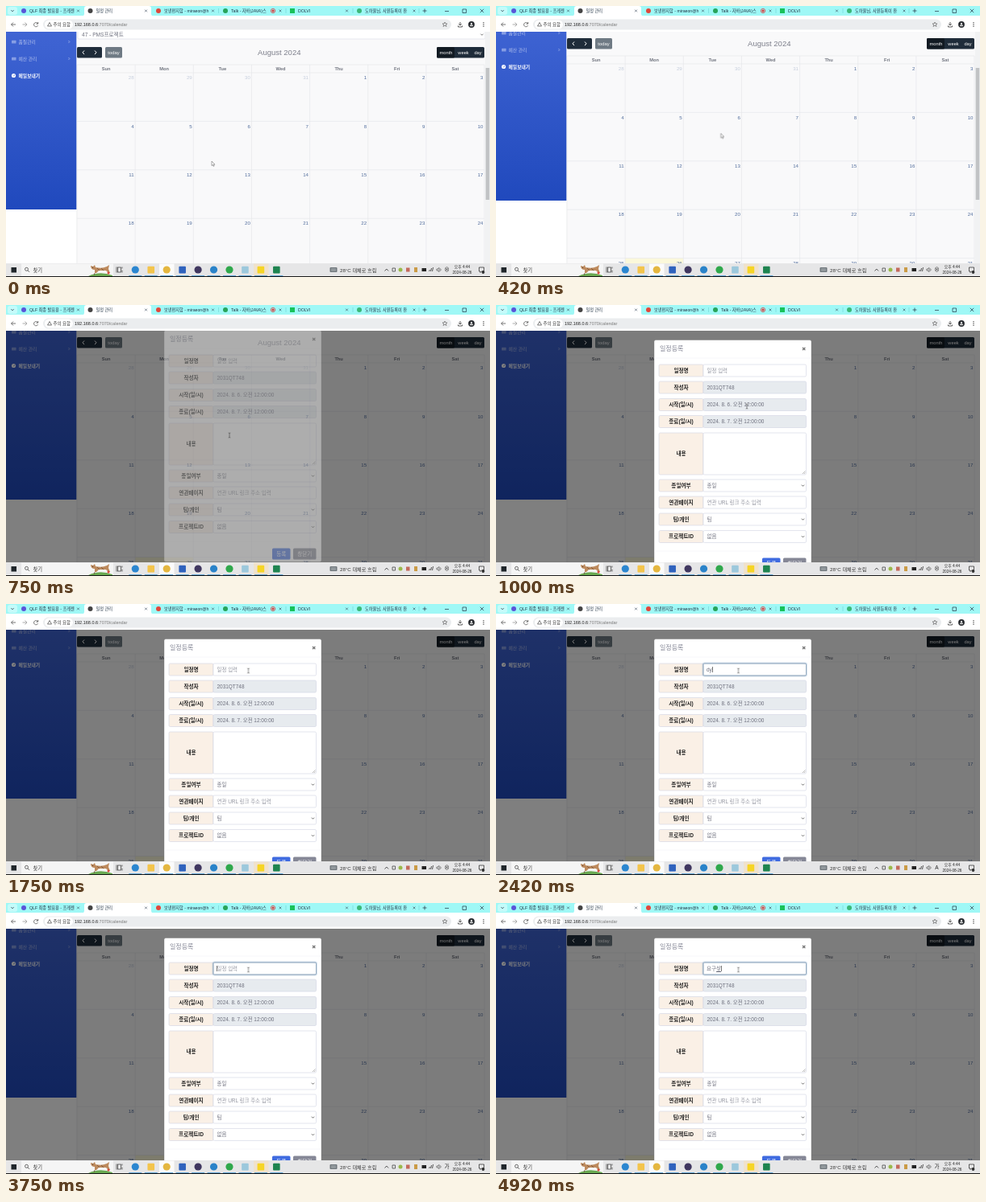
An HTML page that plays this animation: 600x337 px, repeating every 5 s.

```html
<!DOCTYPE html>
<html lang="ko">
<head>
<meta charset="utf-8">
<title>일정 관리</title>
<style>
html, body { margin: 0; width: 100%; height: 100%; overflow: hidden; background: #fff; }
svg { display: block; width: 100%; height: 100%; }
svg, .html { font-family: "Liberation Sans", "Noto Sans CJK KR", "Noto Sans CJK", sans-serif; }
.html { color: #6e707e; font-size: 6.5px; line-height: 12px; white-space: nowrap; }

.scroll, .thumb, .pick, .dim, .modal, .arrow, .beam, .focus, .hint,
.typed, .typed::before, .typed::after, .ime::before { animation: 5s infinite step-end; }
.scroll { animation-name: scroll; animation-timing-function: ease-out; }
.thumb { animation-name: thumb; }
.pick { animation-name: pick; }
.dim { animation-name: dim; }
.modal { animation-name: modal; }
.arrow { animation-name: arrow-move, arrow-show; animation-timing-function: ease-in-out, step-end; }
.beam { animation-name: beam-move, beam-show; animation-timing-function: ease-in-out, step-end; }
.focus { animation-name: focus; }
.hint { animation-name: hint; }
.typed { border-right: .6px solid #777; animation-name: focus; }
.typed::before { content: ""; animation-name: committed; }
.typed::after { content: ""; text-decoration: underline; text-decoration-thickness: .6px; animation-name: composing; }
.ime { color: #222; text-align: center; }
.ime::before { content: "⊗"; animation-name: ime; }

@keyframes scroll { 0%, 1.6% { transform: none } 5%, 100% { transform: translateY(-11px) } }
@keyframes thumb { 0% { opacity: 1 } 10.8%, 100% { opacity: 0 } }
@keyframes pick { 0% { opacity: 0 } 10% { opacity: 1 } 15%, 100% { opacity: 0 } }
@keyframes dim { 0% { opacity: 0 } 11.6% { opacity: .11 } 13.4%, 100% { opacity: .5 } }
@keyframes modal {
  0% { opacity: 0; transform: translateY(-50px) }
  15% { opacity: .38; transform: translateY(-12px) }
  16.6% { opacity: .95; transform: translateY(-3px) }
  18.4%, 100% { opacity: 1; transform: none }
}
@keyframes arrow-move { 0%, 1.6% { transform: translate(255px, 193px) } 9%, 100% { transform: translate(279px, 158px) } }
@keyframes arrow-show { 0% { opacity: 1 } 15%, 100% { opacity: 0 } }
@keyframes beam-move {
  0%, 15.5% { transform: translate(277px, 162px) }
  19.5%, 22% { transform: translate(311px, 126px) }
  31%, 100% { transform: translate(300.5px, 83px) }
}
@keyframes beam-show { 0% { opacity: 0 } 15%, 100% { opacity: 1 } }
@keyframes focus { 0% { opacity: 0 } 36%, 100% { opacity: 1 } }
@keyframes hint { 0% { opacity: 1 } 46.6% { opacity: 0 } 68.4% { opacity: 1 } 83.4%, 100% { opacity: 0 } }
@keyframes committed {
  0% { content: "" } 46.6% { content: "d" } 48.4% { content: "dy" } 51.6% { content: "dyr" }
  55% { content: "dyrn" } 61.6% { content: "dyr" } 63.4% { content: "dy" } 65% { content: "d" }
  68.4% { content: "" } 90% { content: "요" } 95%, 100% { content: "요구" }
}
@keyframes composing {
  0% { content: "" } 83.4% { content: "ㅇ" } 85% { content: "요" } 88.4% { content: "욕" }
  90% { content: "구" } 93.4% { content: "굿" } 95% { content: "사" } 98.4%, 100% { content: "샇" }
}
@keyframes ime { 0% { content: "⊗" } 36% { content: "A" } 71.6%, 100% { content: "가" } }
</style>
</head>
<body>
<svg id="stage" viewBox="0 0 600 337" preserveAspectRatio="none"></svg>
<script>
const rect = (x, y, w, h, fill, extra = '') =>
  `<rect x="${x}" y="${y}" width="${w}" height="${h}" fill="${fill}" ${extra}/>`;
const dot = (x, y, r, fill, extra = '') => `<circle cx="${x}" cy="${y}" r="${r}" fill="${fill}" ${extra}/>`;
const line = (d, color = '#444', width = .8) =>
  `<path d="${d}" fill="none" stroke="${color}" stroke-width="${width}"/>`;
// y is the vertical middle of the text
const text = (x, y, str, size, fill, extra = '') =>
  `<text x="${x}" y="${y + size * .36}" font-size="${size}" fill="${fill}" ${extra}>${str}</text>`;
const cross = (x, y, r, color, width) =>
  line(`M${x - r} ${y - r}l${2 * r} ${2 * r}m0 ${-2 * r}l${-2 * r} ${2 * r}`, color, width);
const chevron = (x, y, color, width = .8) => line(`M${x - 1.6} ${y - .8}l1.6 1.6l1.6-1.6`, color, width);
const middle = 'text-anchor="middle"', end = 'text-anchor="end"', bold = 'font-weight="700"';

function sidebar() {
  const item = (y, label, opacity, weight) => `<g opacity="${opacity}">
    ${weight ? dot(9.5, y, 2.6, '#fff') + line(`M9.5 ${y + .8}l1.2-1.8`, '#3558c4') : rect(7, y - 1.8, 5.5, 3.8, '#b9c7f2', 'rx=".6"')}
    ${text(15.5, y, label, 5.8, '#fff', weight)}
    ${weight ? '' : line(`M77.4 ${y - 1.5}l1.5 1.5l-1.5 1.5`, '#fff', .7)}</g>`;
  return rect(0, 0, 87.3, 253, 'url(#blue)') +
    item(44.5, '품질관리', .6, '') + item(65.5, '예산 관리', .6, '') + item(86.5, '메일보내기', 1, bold);
}

function calendar() {
  const colX = c => 88 + 72.15 * c, rowY = r => 83 + 60.4 * r;
  const days = ['Sun', 'Mon', 'Tue', 'Wed', 'Thu', 'Fri', 'Sat'];
  const grid = '#e2e5e8', button = '#1f2c3a';
  let out = rect(87.3, 20, 513, 340, '#f9f9fa') +
    rect(89, 28, 505, 13, '#fff', 'stroke="#d8dae4" stroke-width=".6" rx="1.5"') +
    text(94, 35.5, '47 - PMS프로젝트', 6.6, '#6e707e') + chevron(590, 35.5, '#555') +
    rect(88, 51, 31, 13.5, button, 'rx="1.5"') +
    line('M97 55.5l-2 2.3l2 2.3M110 55.5l2 2.3l-2 2.3', '#fff', 1) +
    rect(123, 51, 21, 13.5, '#6f7a84', 'rx="1.5"') + text(133.5, 57.6, 'today', 5.9, '#fff', middle) +
    text(338.8, 58, 'August 2024', 9.5, '#7d7f8b', middle) +
    rect(534, 51, 59, 13.5, button, 'rx="1.5"') + rect(534, 51, 22, 13.5, '#121a22', 'rx="1.5"') +
    ['month', 'week', 'day'].map((s, i) => text([545.5, 567, 585][i], 57.6, s, 5.7, '#fff', middle)).join('') +
    rect(colX(1), rowY(4), 72, 60, '#fbf8da') +
    rect(colX(2), rowY(1), 72.15, 60.4, '#dcf4ef', 'class="pick"');
  for (let c = 0; c <= 7; c++) out += line(`M${colX(c)} 73V360`, grid, .6);
  out += line('M88 73H593', grid, .6);
  for (let r = 0; r < 5; r++) {
    out += line(`M88 ${rowY(r)}H593`, grid, .6);
    for (let c = 0; c < 7; c++) {
      const day = r * 7 + c - 3;
      out += text(colX(c + 1) - 1.6, rowY(r) + 6, day > 0 ? day : day + 31, 6.1, '#506c9c',
        `${end} opacity="${day > 0 ? 1 : .3}"`);
    }
  }
  return out + days.map((d, c) => text(colX(c) + 36, 78, d, 5.7, '#70747f', `${middle} ${bold}`)).join('');
}

function modal() {
  const border = 'stroke="#d1d3e2" stroke-width=".6"';
  const row = (y, label, value, { h = 15, locked, select, hint } = {}) =>
    rect(202, y, 55, h, '#faf0e6', border + ' rx="1.5"') +
    rect(257, y, 127.5, h, locked ? '#e7ebef' : '#fff', border + ' rx="1.5"') +
    text(229.5, y + h / 2, label, 6.6, '#222', `${middle} ${bold}`) +
    text(261.5, y + h / 2, value, 6.45, hint ? '#92949f' : '#6e707e', hint || '') +
    (select ? chevron(380.5, y + h / 2, '#444') : '');
  return rect(196, 43.5, 195, 288, '#fff', 'rx="2" stroke="#777" stroke-width=".4"') +
    text(203, 54.5, '일정등록', 8, '#858796') + cross(381.7, 54.5, 1.7, '#666', 1.2) +
    line('M196 66H391', '#eceef4', .5) +
    row(74, '일정명', '일정 입력', { hint: 'class="hint"' }) +
    `<g class="focus">${rect(256.5, 73.5, 128.5, 16, 'none', 'stroke="#4e80b0" stroke-opacity=".25" stroke-width="2" rx="2"')}
     ${rect(257, 74, 127.5, 15, 'none', 'stroke="#8fa5b8" stroke-width=".8" rx="1.5"')}</g>` +
    `<foreignObject x="261" y="75.5" width="115" height="12"><div class="html"><span class="typed"></span></div></foreignObject>` +
    row(95, '작성자', '2031QT748', { locked: true }) +
    row(116.5, '시작(일/시)', '2024. 8. 6. 오전 12:00:00', { locked: true }) +
    row(137.5, '종료(일/시)', '2024. 8. 7. 오전 12:00:00', { locked: true }) +
    row(159, '내용', '', { h: 52 }) + line('M380 210l3.5-3.5M382 210l1.5-1.5', '#888', .6) +
    row(217, '종일여부', '종일', { select: true }) +
    row(238, '연관페이지', '연관 URL 링크 주소 입력', { hint: ' ' }) +
    row(259, '팀/개인', '팀', { select: true }) +
    row(280.5, '프로젝트ID', '없음', { select: true }) +
    line('M196 306H391', '#eceef4', .5) +
    rect(330, 314.5, 22.5, 14, '#3f6be0', 'rx="1.5"') + text(341.2, 321.5, '등록', 6.5, '#fff', middle) +
    rect(356, 314.5, 28.5, 14, '#858796', 'rx="1.5"') + text(370.2, 321.5, '창닫기', 6.5, '#fff', middle);
}

function browser() {
  const tab = (x, color, label, closeX, square) =>
    (square ? rect(x - 3, 3, 6, 6, color) : dot(x, 6, 3, color)) +
    text(x + 7, 6, label, 5.2, '#234') + cross(closeX, 6, 1.4, '#345', .6);
  return rect(0, 0, 600, 13, '#9ff8f6') + rect(0, 12, 600, 20, '#fff') +
    rect(2, 1, 12, 10, '#c4fbfa', 'rx="3"') + chevron(8, 6, '#234') +
    '<path d="M94 12.5q3 0 3-3V3q0-3 3-3h77q3 0 3 3v6.5q0 3 3 3z" fill="#fff"/>' +
    tab(22, '#5b55d8', 'QLF 최종 발표용 - 프레젠', 89.5) +
    tab(104.5, '#444', '일정 관리', 173.5) +
    tab(189, '#e0483c', '보낸편지함 - miraeon@h', 256.5) +
    tab(272, '#28a45a', 'Talk - 자바(JAVA)스', 340) +
    dot(331, 6, 2.7, 'none', 'stroke="#d33" stroke-width=".7"') + dot(331, 6, 1.5, '#d33') +
    tab(355, '#19c25a', 'DOLVI', 422.5, true) +
    tab(438, '#3cb878', '도하율님, 사원등록이 완', 506) +
    line('M263.5 3v6M347 3v6M430 3v6M512 3v6', '#6cc', .5) +
    line('M516.5 6h5m-2.5-2.5v5M544 6.5h5M566 4h4.5v4.5h-4.5z', '#234', .7) + cross(590, 6, 2.2, '#234', .7) +
    line('M12 23H6.5m2.5-2.5l-2.5 2.5l2.5 2.5', '#555') + line('M20.5 23h5.5m-2.5-2.5l2.5 2.5l-2.5 2.5', '#999') +
    line('M39.5 22a2.6 2.6 0 1 0 0 2.3M39.7 20v2.2h-2.2', '#555') +
    rect(46, 16.5, 506, 13, '#ebedef', 'rx="6.5"') + rect(48, 17.5, 35, 11, '#fff', 'rx="5.5"') +
    line('M51.5 25l2.5-4.5l2.5 4.5z', '#444', .7) + text(58.5, 23, '주의 요함', 5.4, '#333') +
    text(85, 23, '192.168.0.6<tspan fill="#777">:7070/calendar</tspan>', 5.5, '#222') +
    line('M544 20l.9 2h2.1l-1.7 1.3l.7 2.2l-2-1.3l-2 1.3l.7-2.2l-1.7-1.3h2.1z', '#555', .6) +
    line('M563 20v4m-1.8-1.7l1.8 1.7l1.8-1.7M560.5 24.5v1.5h5v-1.5', '#333') +
    dot(577, 23, 3.9, '#25282c') + dot(577, 22, 1.2, '#ddd') + rect(575, 23.6, 4, 1.7, '#ddd', 'rx=".8"') +
    [20.7, 23, 25.3].map(y => dot(592, y, .7, '#444')).join('');
}

function taskbar() {
  const icons = [['#2b86d0', 1], ['#f3c44c', 0], ['#e4b740', 1], ['#2f62bd', 0], ['#403760', 1],
    ['#2a83c9', 1], ['#2fa84c', 1], ['#9cc8dc', 0], ['#f6d526', 0], ['#1e8450', 0]];
  const tray = '#333';
  return rect(0, 320, 600, 17, '#e6e6e7') + rect(6.5, 325, 6.5, 6.5, '#20262b') +
    rect(19, 320.5, 114, 16, '#f5f5f5') + dot(25.5, 327.3, 2, 'none', 'stroke="#333" stroke-width=".7"') +
    line('M27 328.8l2 2', '#333') + text(33.5, 328.3, '찾기', 6.3, '#444') +
    '<path d="M102 336q14-7 30-1v1z" fill="#69a951"/>' +
    '<path d="M105 323l3 1l2-2l1 3q8 2 14-1l3-2l-1 5l2 5h-2l-3-3h-9l-3 3h-2v-4q-5 0-5-5z" fill="#bd8a5d"/>' +
    line('M113 326l3 3m2-3l3 3m-11 3l-1 3', '#6b4632', .7) + dot(107.5, 325, .6, '#322') + dot(127, 332, 1.5, '#d94b3e') +
    rect(138.5, 325, 4, 6, 'none', 'stroke="#333" stroke-width=".7"') + line('M137 324.5v7m7-7v2m0 2v3', '#333', .7) +
    rect(190, 320.5, 18.5, 16, '#fbfbfb') + rect(307, 320.5, 18.5, 16, '#f0e2cc') +
    icons.map(([color, round], i) => {
      const x = 160.3 + 19.45 * i;
      return (round ? dot(x, 328, 4.6, color) : rect(x - 4.3, 323.8, 8.6, 8.6, color, 'rx="1"')) +
        rect(x - 8, 335, 16, 1, '#5a9fd0');
    }).join('') +
    rect(0, 336, 600, 1, '#1a1a1a') +
    rect(401.5, 325, 9, 6, '#70777c', 'rx="1"') + line('M403 327h6m-6 2h6', '#dde3e6', .6) +
    text(414, 328.3, '28°C 대체로 흐림', 6.15, '#333') +
    line('M469.5 329.5l2.3-2.5l2.3 2.5', tray) +
    line('M479 326h3.5v4h-3.5z', tray, .7) + dot(489, 328, 2.5, '#9ab94a') + rect(496, 325.5, 4.5, 5, '#c46a5c') +
    rect(506, 325, 4, 6, '#ca9b46') + rect(515.5, 326, 5.5, 4, '#222') +
    line('M524.5 330l1-2m1 2l1-4m1 4l1-5', tray) +
    line('M534 327h1.2l1.8-1.5v5l-1.8-1.5h-1.2zM538.5 326.5q1.3 1.5 0 3', tray, .6) +
    '<foreignObject x="540" y="322" width="13" height="13"><div class="html ime"></div></foreignObject>' +
    text(565.5, 324.3, '오후 4:44', 4.8, '#222', middle) + text(565.5, 331.5, '2024-08-26', 4.7, '#222', middle) +
    line('M586.5 325h6v5h-3l-1.5 1.5v-1.5h-1.5z', '#222', .7) + dot(591.5, 331, 1.9, '#333');
}

document.getElementById('stage').innerHTML = `
  <defs>
    <linearGradient id="blue" x2="0" y2="1"><stop stop-color="#4468d6"/><stop offset="1" stop-color="#2049bd"/></linearGradient>
    <clipPath id="view">${rect(0, 32, 600, 288, '#000')}</clipPath>
  </defs>
  <g clip-path="url(#view)">
    ${rect(0, 32, 600, 288, '#fff')}
    <g class="scroll">${calendar()}${sidebar()}</g>
    <g class="thumb">${rect(594, 32, 6, 288, '#f1f2f3')}${rect(594.7, 77, 4.6, 164, '#c1c3c5')}</g>
    ${rect(0, 32, 600, 288, '#000', 'class="dim"')}
    <g class="modal">${modal()}</g>
  </g>
  ${browser()}${taskbar()}
  <path class="arrow" d="M0 0v5.6l1.3-1.2l.9 2l.9-.4l-.9-1.9h1.8z" fill="#fff" stroke="#555" stroke-width=".5"/>
  <path class="beam" d="M-1.3-3q1.3 0 1.3.7q0-.7 1.3-.7M0-2.5V2.5M-1.3 3q1.3 0 1.3-.7q0 .7 1.3.7" fill="none" stroke="#444" stroke-width=".6"/>`;
</script>
</body>
</html>
```
